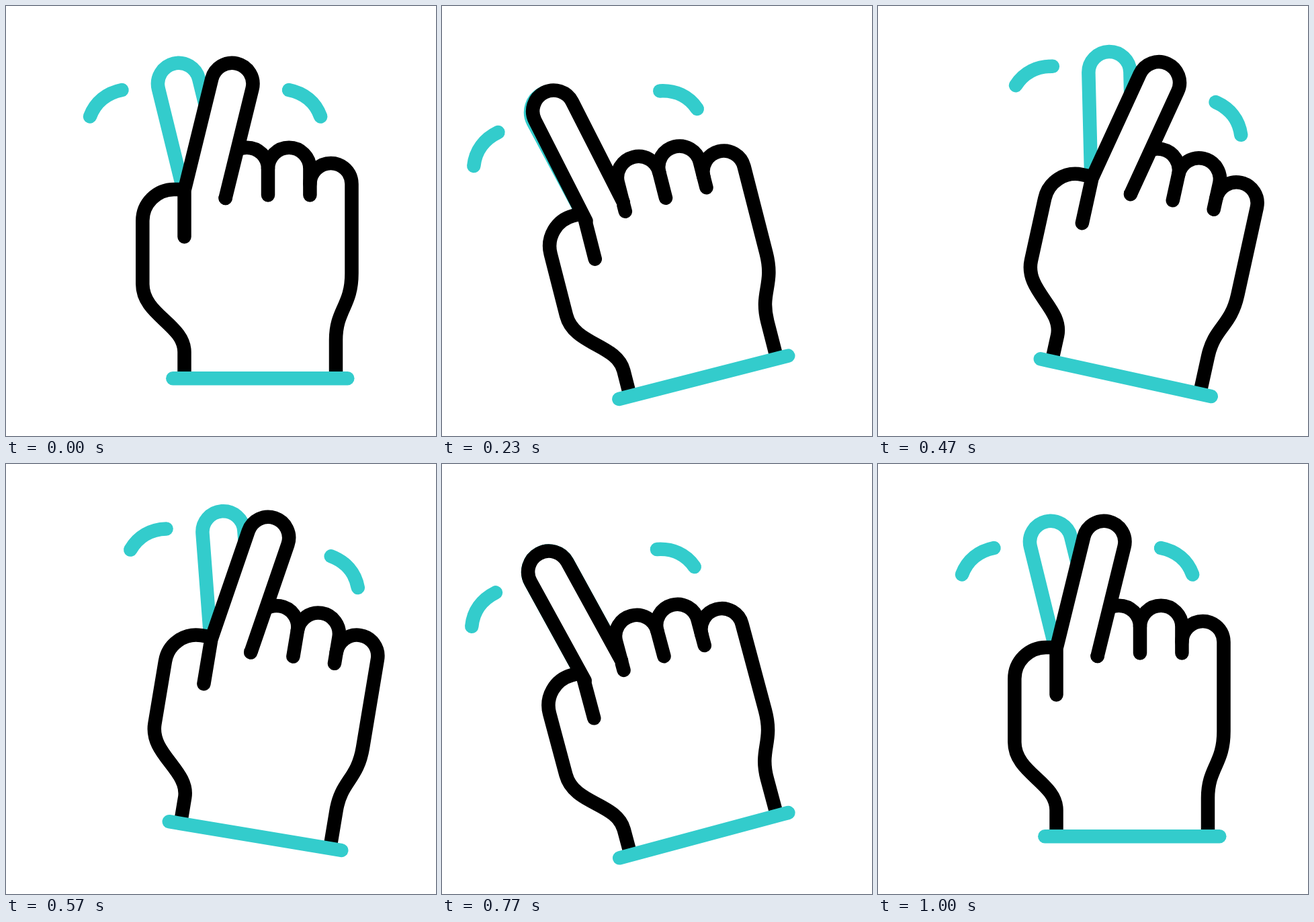
An HTML page that plays this animation: 640 px wide and 640 px high, repeating every 1670 ms.

```html
<!DOCTYPE html>
<html lang="en">
<head>
<meta charset="utf-8">
<title>Finger wag</title>
<style>
  html, body { margin: 0; width: 100%; height: 100%; overflow: hidden; background: #fff; }
  svg { display: block; width: 100vw; height: 100vh; }
  path { fill: none; stroke: #000; stroke-width: 20.5; stroke-linecap: round; stroke-linejoin: round; }
  .teal { stroke: #33cccc; }
  .solid { fill: #fff; }
</style>
</head>
<body>
<svg viewBox="0 0 640 640">
  <g id="hand">
    <!-- resting finger behind the hand -->
    <path class="teal" transform="translate(296.7 277.5) rotate(-13.8)" d="M-31 -8V-166.5A31 31 0 0 1 31 -166.5V-8"/>
    <!-- motion marks -->
    <path class="teal" d="M172.5 125C150 129.5 133 143 125 164.5"/>
    <path class="teal" d="M421 125C443.5 129.5 460.5 143 468.2 164.5"/>
    <!-- thumb and left side -->
    <path d="M265.5 343.5V273H250A46.8 46.8 0 0 0 203.3 320V414C203.3 460 265.5 474 265.5 515V548"/>
    <!-- knuckles and right side -->
    <path d="M326.7 286V242A31.5 31.2 0 0 1 390 242V281.5"/>
    <path d="M390 242A31.2 31.2 0 0 1 452.4 242V281.5"/>
    <path d="M452.4 265A31 31 0 0 1 514.5 265V398C514.5 447 491 452 491 497V548"/>
    <path class="teal" d="M248.3 554.2H508.3"/>
    <path id="finger" class="solid" d="M-31 1V-166.5A31 31 0 0 1 31 -166.5V1"/>
  </g>
</svg>
<script>
  const LOOP = 1670;
  // [step, hand angle, finger angle], 30 steps per second
  const KEYS = [
    [0, 0, 13.8],
    [8, -15, -13.8],
    [15, 14, 13.8],
    [23, -15, -13.8],
    [30, 0, 13.8]
  ];
  const hand = document.getElementById('hand');
  const finger = document.getElementById('finger');

  const ease = u => u * u * (3 - 2 * u);

  function pose(step) {
    const s = Math.min(step, 30);
    const i = Math.max(1, KEYS.findIndex(k => s <= k[0]));
    const [a, b] = [KEYS[i - 1], KEYS[i]];
    const p = ease((s - a[0]) / (b[0] - a[0]));
    return [1, 2].map(n => a[n] + (b[n] - a[n]) * p);
  }

  function draw(now) {
    // steps start on 10 ms marks, hence the small offset
    const step = Math.floor((now % LOOP) * 0.03 + 0.11);
    const [handAngle, fingerAngle] = pose(step);
    hand.setAttribute('transform', `rotate(${handAngle} 378.2 509.8)`);
    finger.setAttribute('transform', `translate(296.7 277.5) rotate(${fingerAngle})`);
  }

  const start = performance.now();
  function tick() {
    draw(performance.now() - start);
    requestAnimationFrame(tick);
  }
  tick();
</script>
</body>
</html>
```
